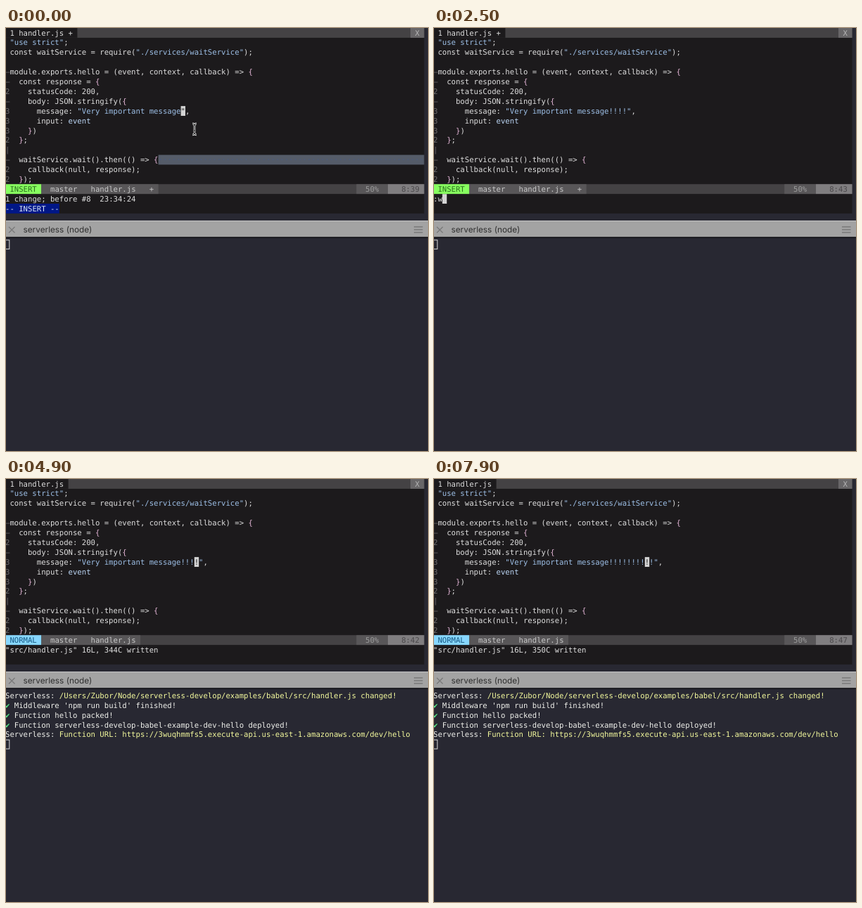
An HTML page that plays this animation: 600x602 px, repeating every 8000 ms.

```html
<!DOCTYPE html>
<html lang="en">
<head>
<meta charset="utf-8">
<title>Editor and terminal</title>
<style>
  html, body { margin: 0; width: 100%; height: 100%; overflow: hidden; background: #282832; }
  svg { display: block; width: 100%; height: 100%; }
  text {
    font: 10.63px "DejaVu Sans Mono", "DejaVu Sans", monospace;
    white-space: pre;
    text-rendering: geometricPrecision;
  }
  text.title { font: 11.8px Inter, sans-serif; }
</style>
</head>
<body>
<svg id="stage" viewBox="0 0 600 602"></svg>
<script>
const LOOP = 8000;
const COL = 6.4, ROW = 13.89, LEFT = -1, TERM_TOP = 301.3;
const FG = '#dedede', STRING = '#9dbfe6', BRACE = '#e3b5d6', YELLOW = '#f3f99d', GREEN = '#5af78e';
const EDITOR_BG = '#1c1a1c', PANE_BG = '#282832';

const stage = document.getElementById('stage');
const colX = col => LEFT + col * COL;
const escapeXml = s => s.replace(/&/g, '&amp;').replace(/</g, '&lt;').replace(/>/g, '&gt;');

const rect = (x, y, w, h, fill) =>
  `<rect x="${x}" y="${y}" width="${w}" height="${h}" fill="${fill}"/>`;

const cells = (row, from, to, fill) =>
  rect(colX(from), row * ROW, (to - from) * COL, ROW, fill);

// A run is a string in the default colour or a [string, colour] pair.
function write(row, col, runs, fill = FG, top = 0) {
  const spans = [].concat(runs).map(run => Array.isArray(run)
    ? `<tspan fill="${run[1]}">${escapeXml(run[0])}</tspan>`
    : escapeXml(run)).join('');
  return `<text x="${colX(col)}" y="${top + row * ROW + 10.6}" fill="${fill}">${spans}</text>`;
}

const code = message => [
  '"use strict";',
  'const waitService = require("./services/waitService");',
  '',
  'module.exports.hello = (event, context, callback) => {',
  '  const response = {',
  '    statusCode: 200,',
  '    body: JSON.stringify({',
  `      message: "${message}",`,
  '      input: event',
  '    })',
  '  };',
  '',
  '  waitService.wait().then(() => {',
  '    callback(null, response);',
  '  });'
];
const GUTTER = '   ––2–3332|–22';
const MESSAGE_ROW = 8;

function highlight(line) {
  return line.split(/("[^"]*"|[{}]|event$)/).filter(Boolean).map(part =>
    /^["]/.test(part) ? [part, STRING]
    : /^[{}]$/.test(part) ? [part, BRACE]
    : part === 'event' ? [part, '#bcd6f5'] : part);
}

// Each step changes the state from its time on.
const steps = [
  [0, { bangs: 0, cursor: 39, ruler: 39, insert: true, banner: true, dirty: true, fold: true,
        pointer: true, status: '1 change; before #8  23:34:24', job: 'node', log: 0 }],
  [100, { fold: false }],
  [200, { pointer: false, bangs: 1, cursor: 40, ruler: 40 }],
  [400, { bangs: 2, cursor: 41, ruler: 41 }],
  [600, { bangs: 3, cursor: 42, ruler: 42 }],
  [800, { bangs: 4, cursor: 43, ruler: 43 }],
  [1200, { banner: false, cursor: 42 }],
  [2100, { status: ':', command: true }],
  [2400, { status: ':w' }],
  [2800, { command: false, status: '"src/handler.js" 16L, 344C written',
           insert: false, dirty: false, ruler: 42 }],
  [3000, { log: 1 }],
  [4200, { job: 'find' }],
  [4500, { job: 'node', log: 2 }],
  [4700, { log: 3 }],
  [5000, { insert: true, banner: true }],
  [5300, { bangs: 5, cursor: 43, ruler: 43, dirty: true }],
  [5500, { bangs: 6, cursor: 44, ruler: 44 }],
  [5700, { bangs: 7, cursor: 45, ruler: 45 }],
  [5900, { bangs: 8, cursor: 46, ruler: 46 }],
  [6000, { bangs: 9, cursor: 47, ruler: 47 }],
  [6200, { bangs: 10, cursor: 48, ruler: 48 }],
  [6900, { banner: false, cursor: 47 }],
  [7300, { status: ':', command: true }],
  [7500, { status: ':w' }],
  [7700, { command: false, status: '"src/handler.js" 16L, 350C written',
           insert: false, dirty: false, ruler: 47 }]
];

function tabBar({ dirty }) {
  return rect(0, 0, 594.5, ROW, '#444244')
    + rect(0, 0, colX(dirty ? 16 : 14), ROW, EDITOR_BG)
    + write(0, 1, '1 handler.js' + (dirty ? ' +' : ''))
    + rect(575, 0, 19.5, ROW, '#686668') + write(0, 91, 'X', '#b4b4b4');
}

function buffer(s) {
  const lines = code('Very important message' + '!'.repeat(s.bangs));
  let out = '';
  lines.forEach((line, i) => {
    out += write(i + 1, 0, GUTTER[i], '#6c6a6c') + write(i + 1, 1, highlight(line));
  });
  if (s.fold) {
    out += rect(colX(34), 13 * ROW, 594.5 - colX(34), ROW, '#555c69')
      + write(13, 34, '·'.repeat(59), '#4c5d82');
  }
  const [row, col] = s.command ? [17, s.status.length] : [MESSAGE_ROW, s.cursor];
  out += cells(row, col, col + 1, '#d4d4d4');
  if (!s.command) out += write(row, col, lines[row - 1][col - 1], '#202020');
  return out;
}

function statusLine({ insert, dirty, ruler }) {
  return rect(0, 16 * ROW, 594.5, ROW, '#444244')
    + rect(0, 16 * ROW, colX(8), ROW, insert ? '#87ff5f' : '#87d7ff')
    + write(16, 1, insert ? 'INSERT' : 'NORMAL', insert ? '#2c6b20' : '#185a82')
    + cells(16, 8, dirty ? 34 : 30, '#585658')
    + write(16, 10, 'master   handler.js' + (dirty ? '   +' : ''), '#c8c8c8')
    + cells(16, 78, 85, '#585658') + write(16, 80, '50%', '#9c9c9c')
    + rect(colX(85), 16 * ROW, 594.5 - colX(85), ROW, '#807e80')
    + write(16, 88, '8:' + ruler, '#4c4a4c');
}

function commandArea({ status, banner }) {
  return write(17, 0, status)
    + (banner ? rect(0, 18 * ROW, colX(12), ROW, '#001787') + write(18, 0, '-- INSERT --', '#dce6fa') : '');
}

const pointer = () => {
  const d = 'M265 136Q268 136 268 139V149Q268 152 265 152M271 136Q268 136 268 139M268 149Q268 152 271 152M266.5 146H269.5';
  return `<path d="${d}" fill="none" stroke="#eee" stroke-width="2.6"/>`
    + `<path d="${d}" fill="none" stroke="#222" stroke-width="1"/>`;
};

function header({ job }) {
  const bars = [283, 287, 291].map(y => rect(580, y - 0.8, 12.5, 1.6, '#7c7c7c')).join('');
  return rect(0, 274, 600, 1, '#c4c4c4') + rect(0, 275, 600, 22.5, '#a3a3a3')
    + rect(0, 297.5, 600, 1.2, '#08080a')
    + '<path d="M4 283l8.5 8.5M12.5 283l-8.5 8.5" stroke="#787878" stroke-width="1.2"/>'
    + `<text class="title" x="24.5" y="291" fill="#303030">serverless (${job})</text>` + bars;
}

const done = text => [['✔', GREEN], text];
const NAME = 'serverless-develop-babel-example-dev-hello';
const changed = ['Serverless: ',
  ['/Users/Zubor/Node/serverless-develop/examples/babel/src/handler.js changed!', YELLOW]];
const built = [changed, done("Middleware 'npm run build' finished!"), done('Function hello packed!')];
const logs = [
  [],
  [changed, [['⠋', FG], 'Running npm run build...']],
  [...built, [['⠋', FG], `Deploying function ${NAME}...`]],
  [...built, done(`Function ${NAME} deployed!`),
    ['Serverless: ', ['Function URL: https://3wuqhmmfs5.execute-api.us-east-1.amazonaws.com/dev/hello', YELLOW]]]
];

function terminal({ log }) {
  const lines = logs[log];
  const fg = '#eff0eb';
  let out = lines.map((line, i) => Array.isArray(line[0])
    ? write(i, 0, [line[0]], fg, TERM_TOP) + write(i, 2, line[1], fg, TERM_TOP)
    : write(i, 0, line, fg, TERM_TOP)).join('');
  if (log === 0 || log === 3) {
    const y = TERM_TOP + lines.length * ROW + 0.5;
    out += `<rect x="-1" y="${y}" width="5.8" height="12.8" fill="none" stroke="#d8d8d8"/>`;
  }
  return out;
}

const stateAt = time => Object.assign({}, ...steps.filter(([at]) => at <= time).map(([, change]) => change));

function render(time) {
  const s = stateAt(time);
  stage.innerHTML = rect(0, 0, 600, 602, PANE_BG) + rect(0, 0, 594.5, 264, EDITOR_BG)
    + tabBar(s) + buffer(s) + statusLine(s) + commandArea(s)
    + (s.pointer ? pointer() : '') + header(s) + terminal(s);
}

const start = performance.now();
let shown = -1;
function tick() {
  const time = (performance.now() - start) % LOOP;
  const step = steps.filter(([at]) => at <= time).length;
  if (step !== shown) {
    shown = step;
    render(time);
  }
  requestAnimationFrame(tick);
}
tick();
</script>
</body>
</html>
```
